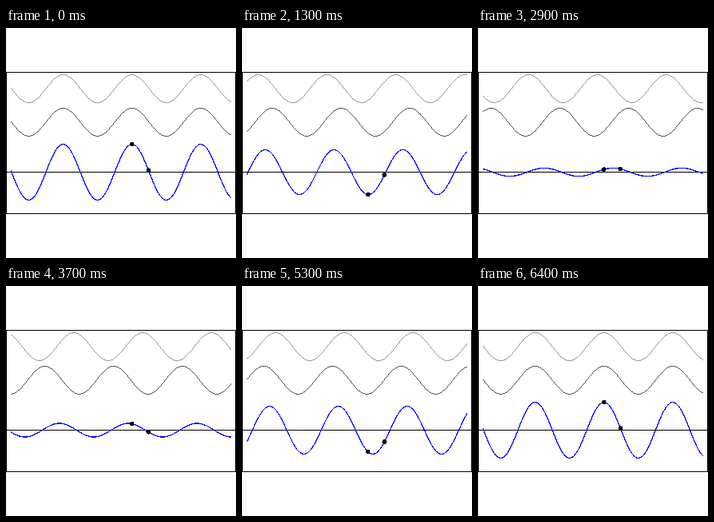
Animation of 288x288 px, one loop 6500 ms. Source, as a matplotlib script:

```python
import numpy as np
import matplotlib.pyplot as plt
from matplotlib.animation import FuncAnimation

SIZE, DPI = 288, 72
FRAMES, INTERVAL = 65, 100

# Pixel layout: x = 0 sits at X0, one unit is UNIT pixels
X0, UNIT, AMP = 157.7, 13.714, 17.45
TOP_Y, MID_Y, SUM_Y = 76.0, 117.9, 180.5
MARKS, DOT_R = (0, 1.5), 2.8
LEFT, RIGHT = 6, 282

GRAY, DARK = (153, 153, 153), (85, 85, 85)
BLUE, BLACK = (0, 0, 255), (0, 0, 0)

rows, cols = np.mgrid[0:SIZE, 0:SIZE] + 0.5
xs = (np.arange(LEFT, RIGHT) + 0.5 - X0) / UNIT


def slow(x, t):
    return np.cos(x - t)


def fast(x, t):
    return np.cos(x - 1.5 * t)


def total(x, t):
    return slow(x, t) + fast(x, t)


# wave, baseline, colour, stroke width
WAVES = [(slow, TOP_Y, GRAY, 1.0),
         (fast, MID_Y, DARK, 1.0),
         (total, SUM_Y, BLUE, 1.4)]


def background():
    img = np.full((SIZE, SIZE, 3), 255, np.uint8)
    for y in (55, 180, 232):
        img[y] = BLACK
    for x in (0, SIZE - 1):
        img[55:233, x] = BLACK
    return img


def stroke(img, y, color, width):
    """Draw a crisp, unsmoothed curve with one height per column."""
    reach = width / 2 * np.maximum(1, np.abs(np.gradient(y)))
    mask = np.abs(rows[:, LEFT:RIGHT] - y) <= reach
    img[:, LEFT:RIGHT][mask] = color


def dot(img, x, y):
    img[np.hypot(cols - x, rows - y) <= DOT_R] = BLACK


def render(k):
    t = 4 * np.pi * k / (FRAMES - 1)
    img = background()
    for wave, base, color, width in WAVES:
        stroke(img, base - AMP * wave(xs, t), color, width)
    for m in MARKS:
        dot(img, X0 + UNIT * m, SUM_Y - AMP * total(m, t))
    return img


fig = plt.figure(figsize=(SIZE / DPI, SIZE / DPI), dpi=DPI, facecolor="white")
ax = fig.add_axes([0, 0, 1, 1])
ax.axis("off")
stage = ax.imshow(render(0), interpolation="nearest", aspect="auto")


def update(k):
    stage.set_data(render(k))
    return [stage]


anim = FuncAnimation(fig, update, frames=FRAMES, interval=INTERVAL,
                     repeat=True, repeat_delay=0, init_func=lambda: update(0))
plt.show()
```
